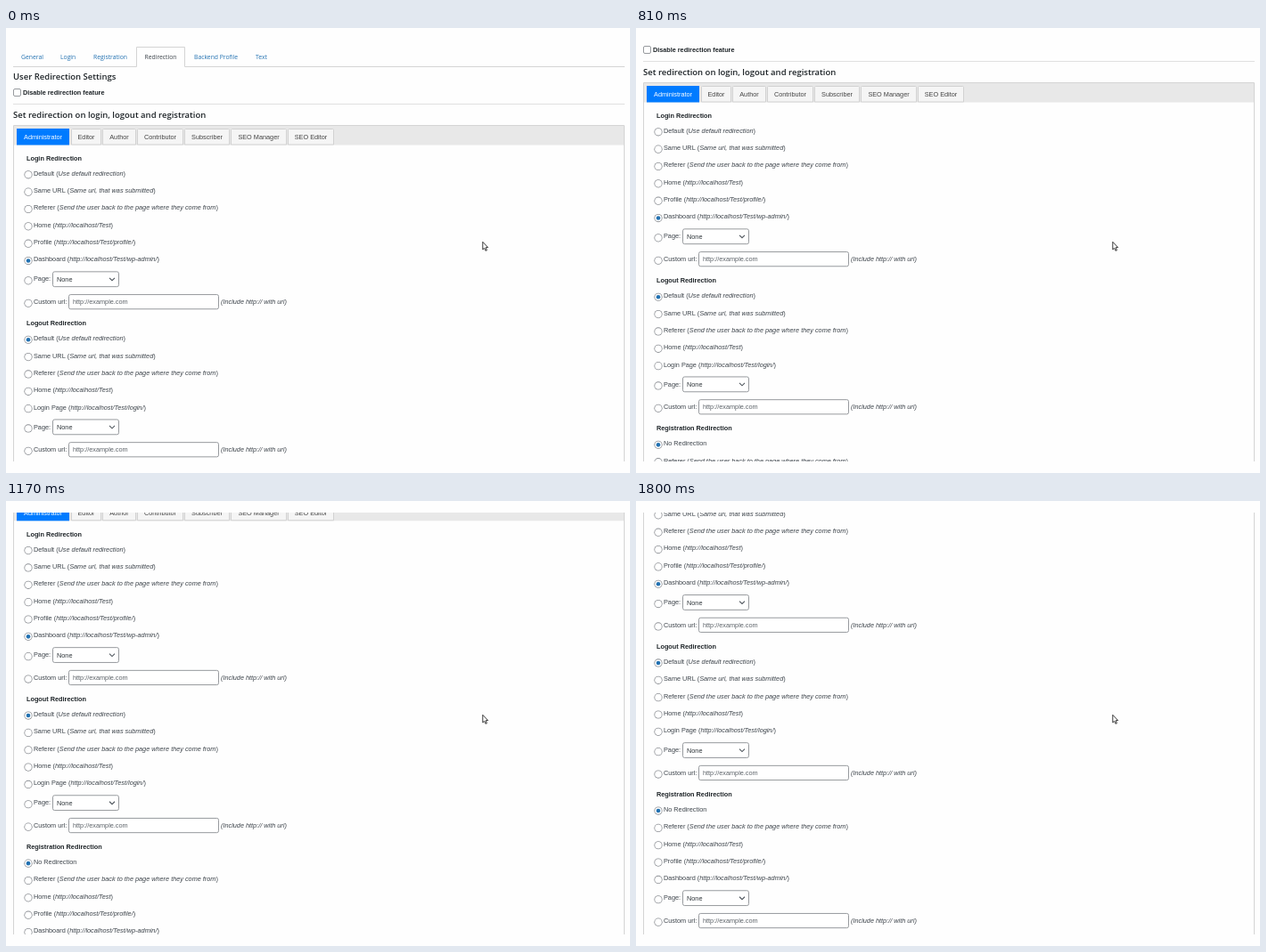
Recreate the animation shown at these times as an HTML page with a canvas. Size 700 px wide and 500 px high, loop 1890 ms.

```html
<!DOCTYPE html>
<html lang="en">
<head>
<meta charset="utf-8">
<title>User Redirection Settings</title>
<style>
  html, body { margin: 0; width: 100%; height: 100%; overflow: hidden; background: #fefefe; }
  canvas { display: block; width: 700px; height: 500px; }
</style>
</head>
<body>
<canvas id="stage"></canvas>
<script>
const LOOP = 1890;
const VIEW = { x: 7, y: 13, w: 687, h: 474 };
const canvas = document.getElementById('stage');
const ratio = window.devicePixelRatio || 1;
canvas.width = 700 * ratio;
canvas.height = 500 * ratio;
const ctx = canvas.getContext('2d');

const SANS = '"Liberation Sans", Arial, sans-serif';
const UI = '"Open Sans", "Noto Sans", sans-serif';
const BODY = `7.3px ${SANS}`;
const ITALIC = `italic ${BODY}`;
const BOLD = `bold ${BODY}`;
const INK = '#3c434a', DARK = '#1d2327', LINK = '#2271b1', EDGE = '#8c8f94', RULE = '#d4d4d4';

// Three wheel notches: [time, scroll offset], each held until the next.
const SCROLL = [
  [0, 0],
  [750, 20.8], [810, 48], [840, 53.5], [870, 55.3], [960, 56],
  [1110, 66], [1140, 91], [1170, 109.2], [1200, 111], [1290, 111.8],
  [1470, 115.6], [1500, 126], [1530, 141], [1560, 155], [1590, 164], [1620, 167.6], [1650, 168.3]
];

const NAV = [['General', 17], ['Login', 61], ['Registration', 98], ['Redirection', 155.5],
  ['Backend Profile', 211], ['Text', 280]];
const ROLES = [['Administrator', 12, 71], ['Editor', 73.5, 106.5], ['Author', 108.5, 145.5],
  ['Contributor', 147.5, 198.5], ['Subscriber', 200.5, 250.5], ['SEO Manager', 252.5, 314.5],
  ['SEO Editor', 316.5, 367.5]];

const SITE = 'http://localhost/Test';
const DEFAULT = ['Default', 'Use default redirection'];
const SAME = ['Same URL', 'Same url, that was submitted'];
const REFERER = ['Referer', 'Send the user back to the page where they come from'];
const HOME = ['Home', SITE];
const PROFILE = ['Profile', SITE + '/profile/'];
const DASHBOARD = ['Dashboard', SITE + '/wp-admin/'];
const SECTIONS = [
  { title: 'Login Redirection', picked: 5, rows: [DEFAULT, SAME, REFERER, HOME, PROFILE, DASHBOARD] },
  { title: 'Logout Redirection', picked: 0,
    rows: [DEFAULT, SAME, REFERER, HOME, ['Login Page', SITE + '/login/']] },
  { title: 'Registration Redirection', picked: 0,
    rows: [['No Redirection'], REFERER, HOME, PROFILE, DASHBOARD] }
];

// y is the middle of the capitals; returns the x where the text ends.
function text(str, x, y, font = BODY, color = INK, drop = 2.6) {
  ctx.font = font;
  ctx.fillStyle = color;
  ctx.fillText(str, x, y + drop);
  return x + ctx.measureText(str).width;
}

function line(points, color, width = 1) {
  ctx.beginPath();
  points.forEach(([x, y]) => ctx.lineTo(x, y));
  ctx.strokeStyle = color;
  ctx.lineWidth = width;
  ctx.stroke();
}

function box(x, y, w, h, r, fill, edge) {
  ctx.beginPath();
  ctx.roundRect(x, y, w, h, r);
  ctx.fillStyle = fill;
  ctx.fill();
  ctx.strokeStyle = edge;
  ctx.lineWidth = 0.9;
  ctx.stroke();
}

function disc(x, y, r, fill) {
  ctx.beginPath();
  ctx.arc(x, y, r, 0, Math.PI * 2);
  ctx.fillStyle = fill;
  ctx.fill();
}

function radio(y, on) {
  disc(25, y, 4.6, EDGE);
  disc(25, y, 3.8, '#fff');
  if (on) disc(25, y, 2.3, LINK);
}

function option([label, note], y, on) {
  radio(y + 1.7, on);
  let x = text(label, 31, y);
  if (!note) return;
  x = text(' (', x, y);
  x = text(note, x, y, ITALIC);
  text(')', x, y);
}

function pageSelect(y) {
  radio(y + 2, false);
  text('Page:', 31, y);
  box(52.5, y - 8, 74, 16.8, 2, '#fff', EDGE);
  text('None', 57, y + 0.5, BODY, '#2c3338');
  line([[116, y - 1], [119, y + 1.9], [122, y - 1]], '#50575e', 1.1);
}

function customUrl(y) {
  radio(y + 2, false);
  text('Custom url:', 31, y);
  box(70.5, y - 7.7, 168, 16.2, 2, '#fff', EDGE);
  text('http://example.com', 75, y + 0.3, BODY, '#5c6268');
  text('(Include http:// with url)', 241, y, ITALIC);
}

function header() {
  line([[8, 43.5], [146.5, 43.5], [146.5, 21.5], [200.5, 21.5], [200.5, 43.5], [694, 43.5]], RULE);
  NAV.forEach(([name, x]) =>
    text(name, x, 32.3, `6.8px ${UI}`, name === 'Redirection' ? INK : LINK));
  const heading = `600 9.5px ${UI}`;
  text('User Redirection Settings', 8, 55, heading, DARK, 3.4);
  box(8.5, 68.5, 8, 8, 1.5, '#fff', EDGE);
  text('Disable redirection feature', 19, 72.3, `bold 7.25px ${SANS}`, DARK);
  line([[8, 85.5], [694, 85.5]], '#e0e0e0');
  text('Set redirection on login, logout and registration', 8, 97.8, heading, DARK, 3.4);
}

function roleTabs() {
  ctx.fillStyle = '#e8e8e8';
  ctx.fillRect(9, 110, 684, 21.5);
  line([[8.5, 700], [8.5, 109.5], [693.5, 109.5], [693.5, 700]], RULE);
  ROLES.forEach(([name, left, right], i) => {
    if (i === 0) {
      ctx.fillStyle = '#007bff';
      ctx.fillRect(left, 113, right - left, 18.5);
    } else {
      box(left, 113.5, right - left, 17.5, [1, 1, 0, 0], '#f5f5f5', '#cfcfcf');
    }
    ctx.textAlign = 'center';
    text(name, (left + right) / 2, 122.3, BODY, i ? '#444' : '#fff');
    ctx.textAlign = 'left';
  });
}

function sections() {
  let y = 146.2;
  for (const { title, picked, rows } of SECTIONS) {
    text(title, 23, y, BOLD, DARK);
    y += 16.9;
    rows.forEach((row, i) => option(row, y + i * 19.35, i === picked));
    y += (rows.length - 1) * 19.35 + 22;
    pageSelect(y);
    y += 25.4;
    customUrl(y);
    y += 24.4;
  }
}

function pointer(x, y) {
  ctx.beginPath();
  [[0, 0], [0, 8.6], [1.9, 7], [3.2, 10], [4.6, 9.4], [3.4, 6.4], [5.9, 6.2]]
    .forEach(([dx, dy]) => ctx.lineTo(x + dx, y + dy));
  ctx.closePath();
  ctx.fillStyle = '#fff';
  ctx.fill();
  ctx.strokeStyle = '#222';
  ctx.lineWidth = 0.9;
  ctx.stroke();
}

function scrollAt(t) {
  let offset = 0;
  for (const [start, y] of SCROLL) if (t >= start) offset = y;
  return offset;
}

function draw(t) {
  ctx.setTransform(ratio, 0, 0, ratio, 0, 0);
  ctx.fillStyle = '#fefefe';
  ctx.fillRect(0, 0, 700, 500);
  ctx.save();
  ctx.beginPath();
  ctx.rect(VIEW.x, VIEW.y, VIEW.w, VIEW.h);
  ctx.clip();
  ctx.translate(0, -scrollAt(t));
  header();
  roleTabs();
  sections();
  ctx.restore();
  pointer(534.8, 240.3);
}

const begin = performance.now();
function tick() {
  draw((performance.now() - begin) % LOOP);
  requestAnimationFrame(tick);
}
tick();
</script>
</body>
</html>
```
